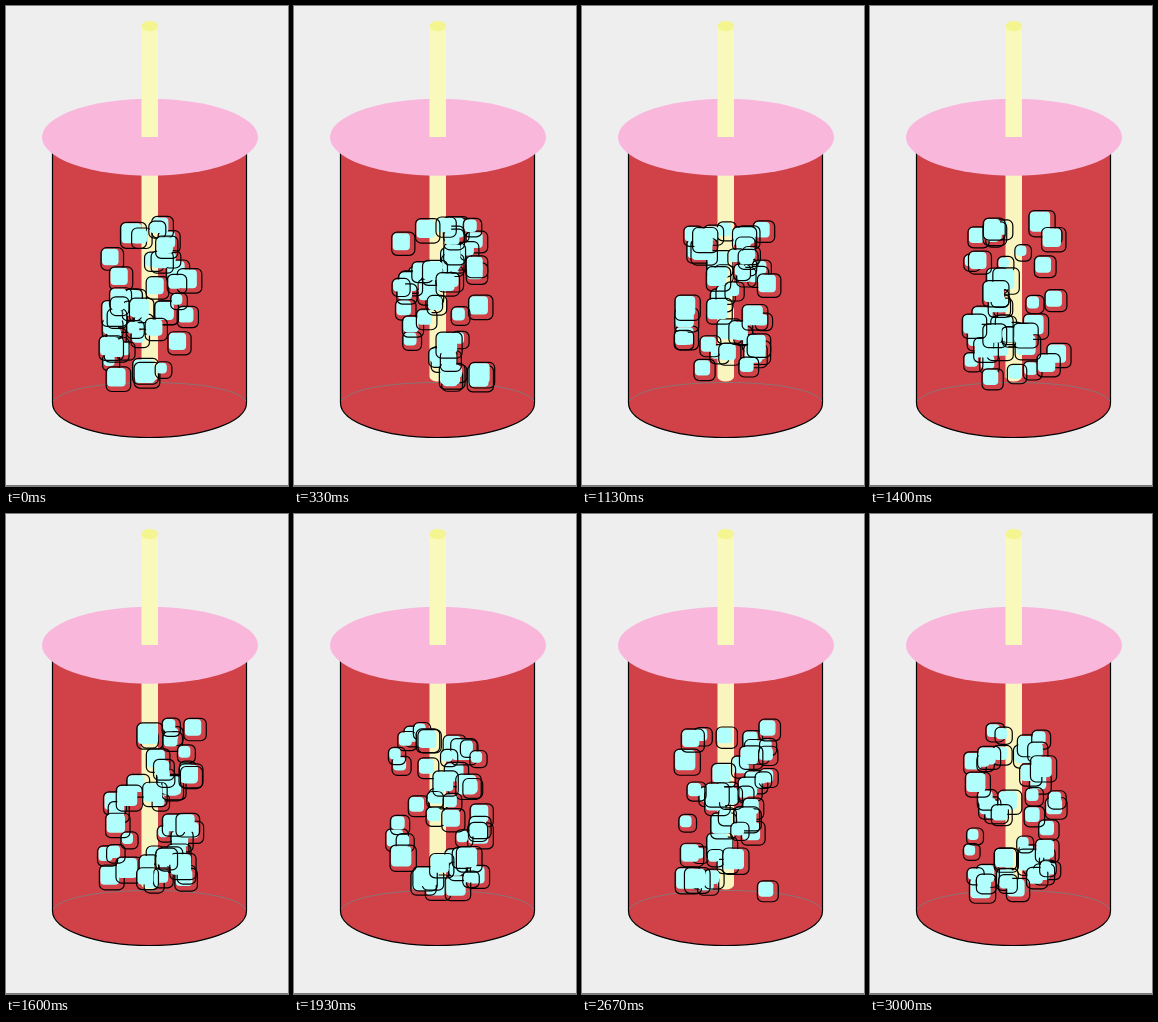
An HTML page for the animation above (3.07 s loop, 282 by 480 pixels).

```html
<!DOCTYPE html>
<html lang="en">
<head>
<meta charset="utf-8">
<title>Iced drink</title>
<style>
  html, body { margin: 0; width: 100%; height: 100%; overflow: hidden; background: #eee; }
  svg { display: block; width: 100vw; height: 100vh; }
</style>
</head>
<body>
<svg viewBox="0 0 282 480">
  <rect width="282" height="480" fill="#eee"/>
  <rect y="479" width="282" height="1" fill="#777"/>
  <path d="M46.5 131V397A97 34.500 0 0 0 240.500 397V131" fill="#d04247" stroke="#000" stroke-width="1.2"/>
  <path d="M47 395C58 382 99 376.500 144 376.500S230 382 240 395" fill="none" stroke="#8a7476"/>
  <path d="M135.500 131V371A8.300 5 0 0 0 152 371V131Z" fill="#faf5bf"/>
  <g id="ice" stroke-width="1.2"></g>
  <ellipse cx="144" cy="131.300" rx="108" ry="38.500" fill="#f9b7dc"/>
  <path d="M135.500 20H152V131H135.500Z" fill="#f9f9bb"/>
  <ellipse cx="143.800" cy="20" rx="8.300" ry="5.300" fill="#f4f490"/>
</svg>
<script>
const LOOP = 3070, STEPS = 46, CUBES = 45;
const ice = document.getElementById('ice');

function setAttributes(element, attributes) {
  for (const name in attributes) element.setAttribute(name, attributes[name]);
  return element;
}

function addRect(attributes) {
  const rect = document.createElementNS('http://www.w3.org/2000/svg', 'rect');
  ice.append(rect);
  return setAttributes(rect, attributes);
}

function seededRandom(seed) {
  return () => {
    seed = (seed + 0x6D2B79F5) | 0;
    let n = Math.imul(seed ^ (seed >>> 15), seed | 1);
    n ^= n + Math.imul(n ^ (n >>> 7), n | 61);
    return ((n ^ (n >>> 14)) >>> 0) / 2 ** 32;
  };
}

const cubes = Array.from({ length: CUBES }, () => ({
  face: addRect({ fill: '#b0fffc', rx: 4 }),
  edge: addRect({ fill: 'none', stroke: '#000', rx: 5.5 })
}));

// Every step scatters all the cubes afresh.
function scatter(step) {
  const random = seededRandom(step * 7919 + 17);
  const between = (low, high) => low + (high - low) * random();
  for (const { face, edge } of cubes) {
    const size = between(16.5, 26.5);
    const x = between(91, 178);
    const y = between(204, 368);
    setAttributes(face, { x: x + 1, y: y + 1, width: size - 6, height: size - 6 });
    setAttributes(edge, { x, y, width: size, height: size });
  }
}

let shown = -1;
function draw(time) {
  const step = Math.floor((time % LOOP) / LOOP * STEPS);
  if (step !== shown) scatter(shown = step);
  requestAnimationFrame(() => draw(performance.now()));
}
draw(0);
</script>
</body>
</html>
```
